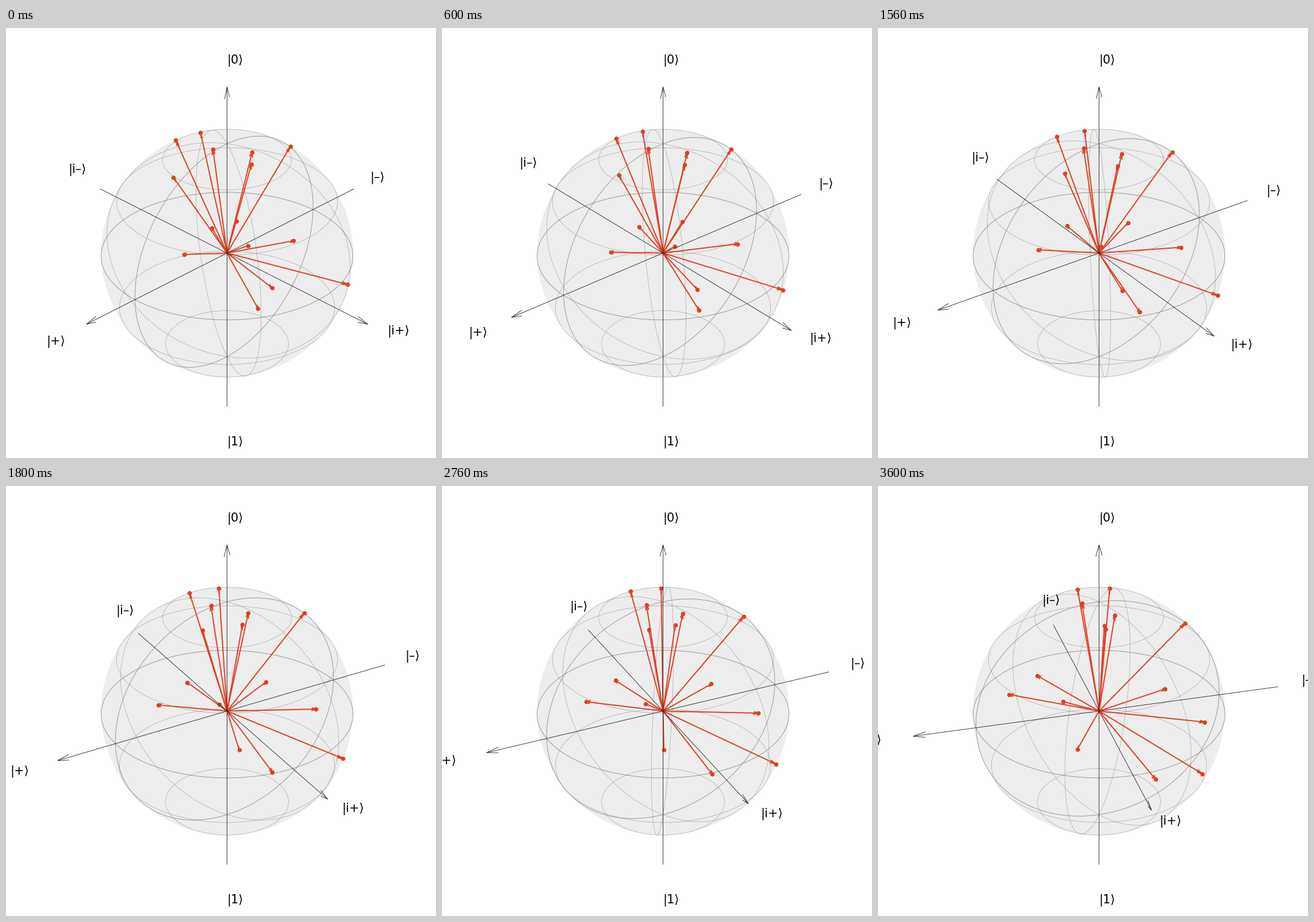
A matplotlib script that plays this animation: 748 px wide and 748 px high, repeating every 4.2 s.

```python
import numpy as np
import matplotlib.pyplot as plt
from matplotlib.animation import FuncAnimation
from matplotlib.collections import LineCollection
from matplotlib.patches import Ellipse

SIZE, DPI = 748, 88
PX = 72 / DPI                      # one pixel in points
FRAMES, INTERVAL = 7, 600
AZIM_START, AZIM_STEP = 45, 5

CENTER = np.array([384.5, 391.5])
SCALE = 218.8                      # pixels per sphere radius
CAMERA = 18.1                      # camera distance in radii
FLAT_UP, Z_UP = 0.506, 0.8455      # screen height of ground depth and of z
FLAT_DEPTH, Z_DEPTH = 0.866, 0.485

RED = "#e04022"

# Longitude and latitude of each state, in degrees.
STATES = [
    (-86.6, 57.1), (-113.5, 54.7), (-9.9, 82.4), (109.6, 77.6), (82.5, 72.1),
    (178.4, 46.0), (-108.1, 12.5), (36.2, 41.7), (-139.6, -15.0), (56.0, 33.7),
    (-171.0, -19.6), (23.5, 28.5), (131.9, -15.4), (65.4, 13.6), (-163.1, -56.8),
]
AXES = [(0, 0), (90, 0), (0, 90)]
LABELS = [
    ("|+⟩", (1.9, 0, 0)), ("|–⟩", (-1.7, 0, 0)),
    ("|i+⟩", (0, 1.7, 0)), ("|i–⟩", (0, -1.9, 0)),
    ("|0⟩", (0, 0, 1.7)), ("|1⟩", (0, 0, -1.9)),
]


def unit(lon, lat):
    lon, lat = np.radians(lon), np.radians(lat)
    return np.stack(np.broadcast_arrays(
        np.cos(lat) * np.cos(lon), np.cos(lat) * np.sin(lon), np.sin(lat)), -1)


def project(points, azim):
    x, y, z = np.moveaxis(np.asarray(points, float), -1, 0)
    a = np.radians(azim)
    side = y * np.cos(a) - x * np.sin(a)
    near = x * np.cos(a) + y * np.sin(a)
    zoom = SCALE / (1 - (FLAT_DEPTH * near + Z_DEPTH * z) / CAMERA)
    return CENTER + np.stack(
        [side * zoom, (FLAT_UP * near - Z_UP * z) * zoom], -1)


def arrow(lon, lat, start, end, head):
    """Shaft and two barbs tilted 15 degrees in the vertical plane."""
    ray = unit(lon, lat)
    tip = end * ray
    barbs = [np.array([tip, tip - head * unit(lon, lat + t)]) for t in (15, -15)]
    return [np.array([start * ray, tip])] + barbs


turn = np.linspace(0, 360, 181)
parallels = [unit(turn, lat) for lat in (-60, -30, 30, 60)]
meridians = [unit(lon, turn) for lon in (60, 120)]
main_circles = [unit(turn, 0), unit(0, turn)]
axis_lines = [s for a in AXES for s in arrow(*a, -1.5, 1.5, 0.1)]
state_lines = [s for a in STATES for s in arrow(*a, 0, 1, 0.05)]
tips = np.array([unit(*a) for a in STATES])

fig = plt.figure(figsize=(SIZE / DPI, SIZE / DPI), dpi=DPI, facecolor="white")
ax = fig.add_axes([0, 0, 1, 1])
ax.set_xlim(0, SIZE)
ax.set_ylim(SIZE, 0)
ax.axis("off")

ax.add_patch(Ellipse(CENTER, 438, 431, fc="#ededed", ec="none", zorder=0))


def add_lines(paths, color, width, zorder):
    lines = LineCollection([], colors=color, linewidths=width * PX, zorder=zorder)
    ax.add_collection(lines, autolim=False)
    return lines, paths


groups = [
    add_lines(parallels + meridians, "#a2a2a2", 0.65, 1),
    add_lines(main_circles, "#858585", 0.8, 2),
    add_lines(state_lines, RED, 2.0, 3),
    add_lines(axis_lines, "#1c1c1c", 0.85, 5),
]
dots, = ax.plot([], [], "o", color=RED, ms=7.6 * PX, mew=0, zorder=4)
texts = [ax.text(0, 0, s, family="DejaVu Sans", size=20.83 * PX, color="black",
                 ha="left", va="baseline", zorder=6) for s, _ in LABELS]


def draw(frame):
    azim = AZIM_START + AZIM_STEP * frame
    for lines, paths in groups:
        lines.set_segments([project(p, azim) for p in paths])
    dots.set_data(*project(tips, azim).T)
    for text, (_, place) in zip(texts, LABELS):
        text.set_position(project(place, azim))
    return [lines for lines, _ in groups] + [dots] + texts


anim = FuncAnimation(fig, draw, frames=FRAMES, init_func=lambda: draw(0),
                     interval=INTERVAL, repeat=True, repeat_delay=0)
plt.show()
```
